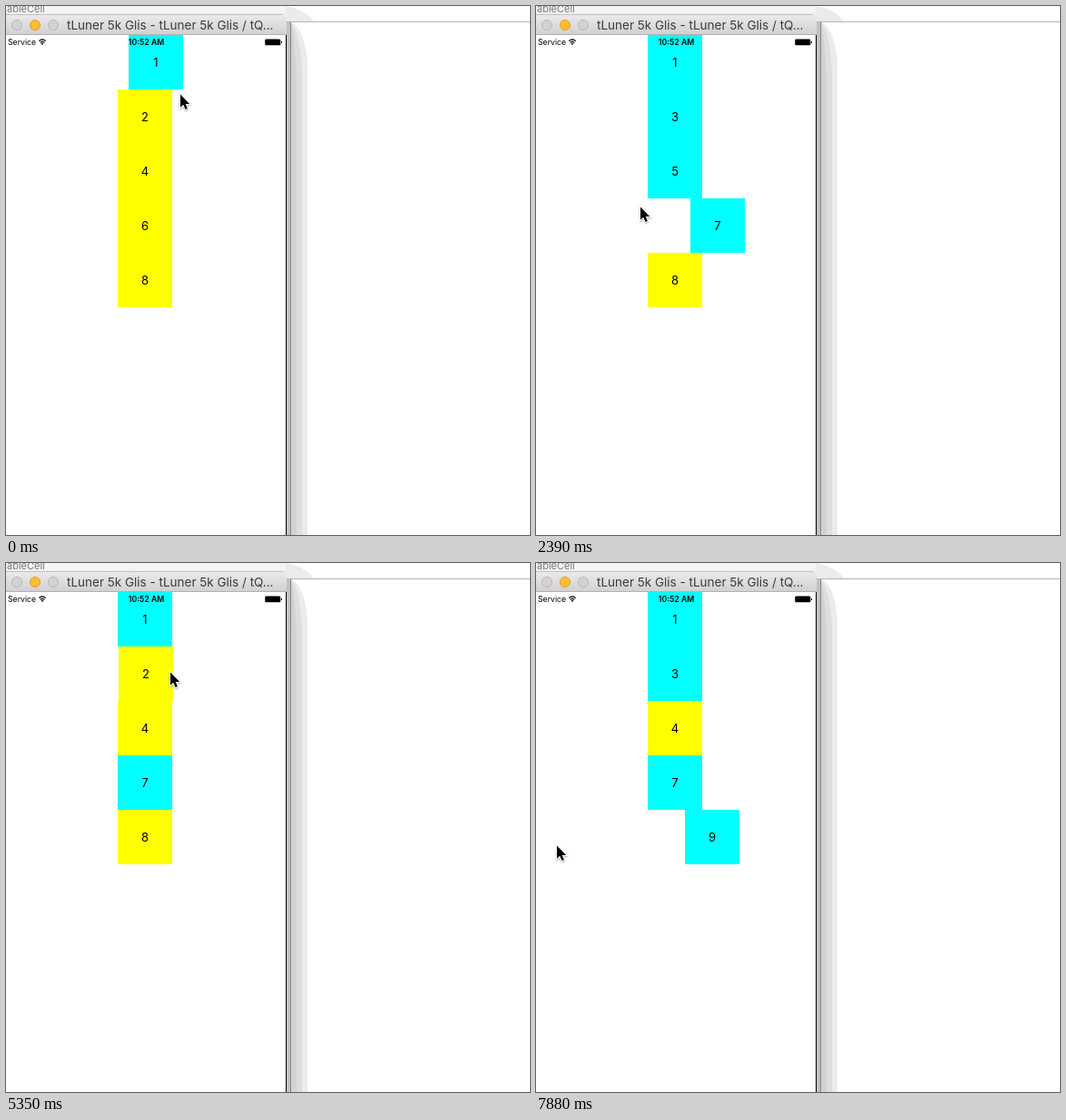
Write an HTML page with a canvas that moves like this. It is 577x583 px and loops after 8 s.

```html
<!DOCTYPE html>
<html lang="en">
<head>
<meta charset="utf-8">
<title>Swipe rows</title>
<style>
  html, body { margin: 0; width: 100%; height: 100%; overflow: hidden; background: #fff; }
  canvas { display: block; }
</style>
</head>
<body>
<canvas id="stage" width="577" height="583"></canvas>
<script>
const ctx = document.getElementById('stage').getContext('2d');
const LOOP = 8000, STEP = 148.8, PAGE = 310, CELL = 60, HOME = 123, TOP = 32, EDGE = 308;
const DRAG = 2, HOLD = 2, GLIDE = 2, PULL = 73, DECAY = 0.2;
const FONT = 'Inter, "Open Sans", sans-serif';

// The finger drags from (x, y) and lets go at the step `release`;
// the row then settles on the next page, or springs back.
const swipe = (row, dir, release, x, y, { lift = 0, travel = PAGE } = {}) =>
  ({ row, dir, release, start: release - DRAG, x, y, lift, travel });

const swipes = [
  swipe(0, -1, -1.854, 264, 97),
  swipe(1, -1, 3.5, 188, 120),
  swipe(2, -1, 7, 184, 178),
  swipe(3, -1, 15, 187, 221),
  swipe(1, 1, 19.09, 160, 142),
  swipe(2, 1, 24, 105, 178),
  swipe(1, 1, 33.33, 165, 131, { lift: 17, travel: 0 }),
  swipe(1, 1, 40.69, 16, 136),
  swipe(1, 1, 47, 199, 122, { travel: 0 }),
  swipe(4, -1, 51.91, 95, 311)
];

const clamp = t => Math.min(1, Math.max(0, t));
const smooth = t => t * t * (3 - 2 * t);
const mix = (a, b, t) => a + (b - a) * t;
const dragged = (s, k) => clamp((k - s.start) / DRAG) ** 2;

function shift(s, k) {
  const settled = 1 - DECAY ** Math.max(0, k - s.release);
  return s.dir * mix(PULL * dragged(s, k), s.travel, settled);
}

function rowOffset(row, k) {
  return swipes.filter(s => s.row === row).reduce((sum, s) => sum + shift(s, k), 0);
}

// The pointer follows the drag, rests, then glides to where the next drag starts.
function pointerAt(k) {
  const i = swipes.findLastIndex(s => s.start <= k);
  const s = swipes[i], next = swipes[i + 1], drag = dragged(s, k);
  const x = s.x + s.dir * PULL * drag, y = s.y - s.lift * drag;
  if (!next) return [x, y];
  const leave = s.release + Math.min(HOLD, 0.65 * (next.start - s.release));
  const arrive = Math.min(leave + GLIDE, next.start);
  const t = smooth(clamp((k - leave) / (arrive - leave)));
  return [mix(x, next.x, t), mix(y, next.y, t)];
}

function rect(color, x, y, w, h) {
  ctx.fillStyle = color;
  ctx.fillRect(x, y, w, h);
}

function text(str, x, y, size, color = '#000', align = 'left', weight = 400) {
  ctx.font = `${weight} ${size}px ${FONT}`;
  ctx.textAlign = align;
  ctx.fillStyle = color;
  ctx.fillText(str, x, y);
}

function shape(d, fill, stroke, width = 1) {
  const path = new Path2D(d);
  if (stroke) {
    ctx.strokeStyle = stroke;
    ctx.lineWidth = width;
    ctx.stroke(path);
  }
  if (fill) {
    ctx.fillStyle = fill;
    ctx.fill(path);
  }
}

function drawDesktop() {
  rect('#fff', 0, 0, 577, 583);
  shape('M0 0H308Q330 4 339 17H0Z', '#ebebeb');
  rect('#f5f5f5', 0, 0, 308, 8);
  text('ableCell', 1, 7, 11, '#777');
  rect('#b4b4b4', 308, 17, 269, 1);
  ['#ebebeb', '#dedede', '#d2d2d2'].forEach((color, i) => {
    const right = 332 - 6 * i;
    shape(`M309 18H314Q${right - 2} ${26 + 6 * i} ${right} ${66 + 6 * i}V583H309Z`, color);
  });
  rect('#c2c2c2', 309, 18, 4, 565);
  rect('#858585', 313, 18, 1, 565);
}

function drawTitleBar() {
  const g = ctx.createLinearGradient(0, 10, 0, 31);
  g.addColorStop(0, '#ebe9eb');
  g.addColorStop(1, '#d2d0d2');
  rect('#c4c4c4', 0, 9, 305, 1);
  shape('M0 10H304Q309 10 309 15V32H0Z', g);
  rect('#b3b1b3', 0, 31, 309, 1);
  ['#d3d1d3', '#ffbe2f', '#d3d1d3'].forEach((color, i) => {
    ctx.beginPath();
    ctx.arc(12 + 20 * i, 21, 5.5, 0, 2 * Math.PI);
    ctx.fillStyle = color;
    ctx.fill();
    ctx.strokeStyle = i === 1 ? '#dfa023' : '#bab8ba';
    ctx.lineWidth = 1;
    ctx.stroke();
  });
  text('tLuner 5k Glis - tLuner 5k Glis / tQ...', 67, 26, 13.5, '#3c3c3c');
}

function drawRows(k) {
  rect('#fff', 0, TOP, EDGE, 583 - TOP);
  ctx.save();
  ctx.beginPath();
  ctx.rect(0, TOP, EDGE, 583 - TOP);
  ctx.clip();
  for (let row = 0; row < 5; row++) {
    const offset = rowOffset(row, k), y = TOP + CELL * row;
    for (let page = -2; page <= 2; page++) {
      const odd = Math.abs(page % 2), x = Math.round(HOME + offset + page * PAGE);
      rect(odd ? '#0ff' : '#ff0', x, y, CELL, CELL);
      text(2 * row + odd, x + 30, y + 35, 13, '#000', 'center');
    }
  }
  ctx.restore();
  rect('#000', EDGE, TOP, 1, 583 - TOP);
}

function drawStatus() {
  text('Service', 2, 43, 8.7);
  shape('M36.2 38.6Q40 35.2 43.8 38.6M37.6 40.4Q40 38.4 42.4 40.4', null, '#000', 1.1);
  shape('M38.5 41.3Q40 40.2 41.5 41.3L40 43Z', '#000');
  text('10:52 AM', 154.5, 43, 8.7, '#000', 'center', 600);
  shape('M286.5 36.5H301Q302.3 36.5 302.3 38V42Q302.3 43.3 301 43.3H286.5Q285.2 43.3 285.2 42V38Q285.2 36.5 286.5 36.5Z', '#000');
  rect('#000', 303, 39, 1, 2);
}

function drawPointer(k) {
  ctx.save();
  ctx.translate(...pointerAt(k).map(Math.round));
  ctx.shadowColor = 'rgba(0,0,0,.35)';
  ctx.shadowBlur = 2;
  ctx.shadowOffsetY = 1;
  const arrow = 'M1 0.5V14.8L4.2 11.8L6.6 17L8.9 16L6.7 11H11.2Z';
  shape(arrow, null, '#fff', 2);
  ctx.shadowColor = 'transparent';
  shape(arrow, '#000');
  ctx.restore();
}

function draw(now) {
  const k = Math.floor((now % LOOP + 8) / STEP);
  drawDesktop();
  drawTitleBar();
  drawRows(k);
  drawStatus();
  drawPointer(k);
}

const start = performance.now();
function tick() {
  draw(performance.now() - start);
  requestAnimationFrame(tick);
}
tick();
</script>
</body>
</html>
```
